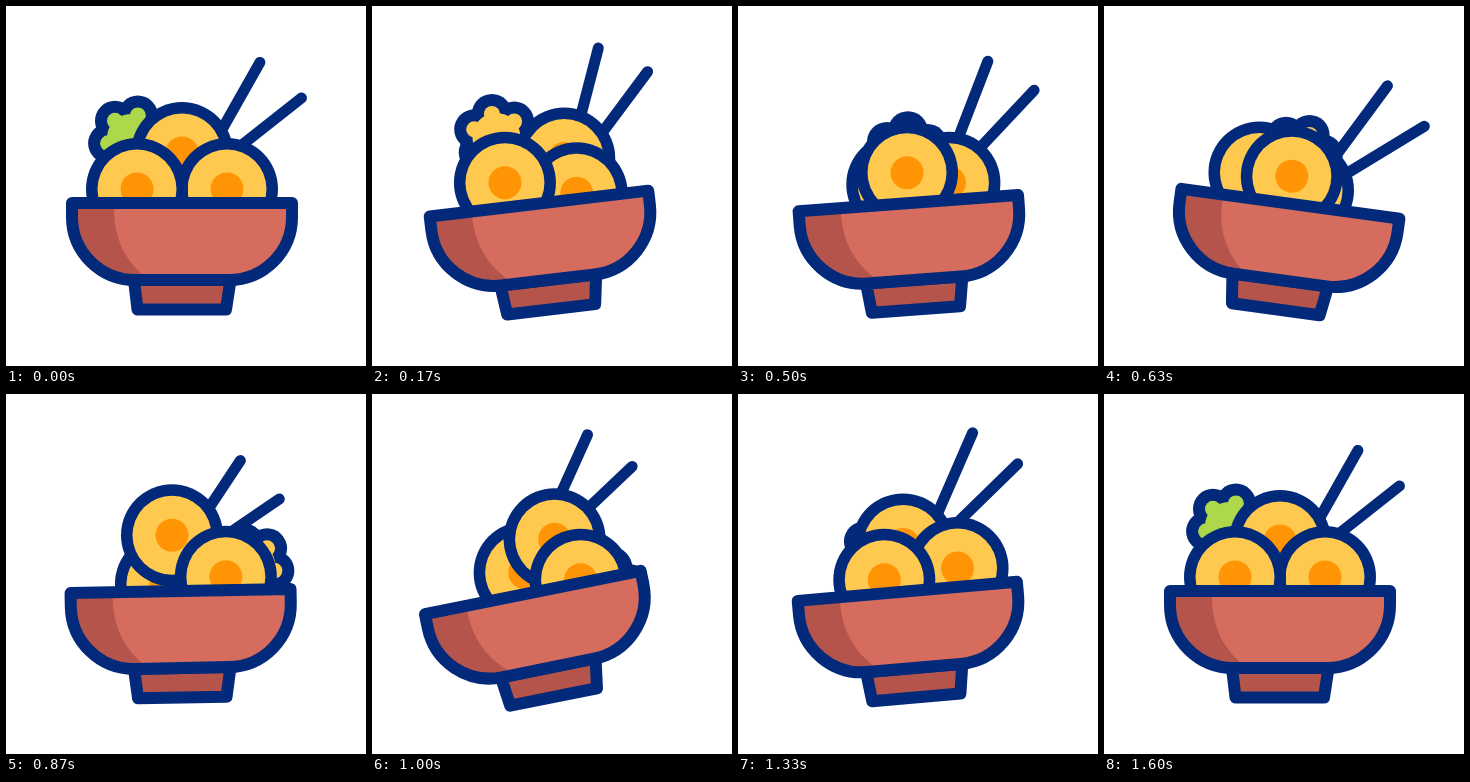
Write an HTML page with a canvas that moves like this. It is 360 by 360 pixels and loops after 2000 ms.

```html
<!DOCTYPE html>
<html lang="en">
<head>
<meta charset="utf-8">
<title>Stirring bowl</title>
<style>
  html, body { margin: 0; width: 100%; height: 100%; overflow: hidden; background: #fff; }
  canvas { display: block; width: 100vw; height: 100vh; object-fit: contain; }
</style>
</head>
<body>
<canvas id="stage" width="360" height="360"></canvas>
<script>
const ctx = document.getElementById('stage').getContext('2d');

const LOOP = 2000, LAST_STEP = 48, STROKE = 12;
const NAVY = '#03297a', YELLOW = '#ffc94f', ORANGE = '#ff9505';
const GREEN = '#aed84c', RED = '#d56c5e', DARK_RED = '#b5544a';

const radians = degrees => degrees * Math.PI / 180;

function hermite(from, to, slopeFrom, slopeTo, p) {
  const q = 1 - p;
  return from * q * q * (1 + 2 * p) + to * p * p * (3 - 2 * p)
    + p * q * (slopeFrom * q - slopeTo * p);
}

// Monotone curve through the keys, at rest at both ends and at every extreme.
function curve(times, values) {
  const last = times.length - 1;
  const rise = i => (values[i + 1] - values[i]) / (times[i + 1] - times[i]);
  const slope = i => {
    if (i === 0 || i === last) return 0;
    const a = rise(i - 1), b = rise(i);
    return a * b > 0 ? 2 * a * b / (a + b) : 0;
  };
  return time => {
    if (time >= times[last]) return values[last];
    const i = times.findIndex(t => t > time) - 1;
    const span = times[i + 1] - times[i];
    return hermite(values[i], values[i + 1], slope(i) * span, slope(i + 1) * span,
      (time - times[i]) / span);
  };
}

// Smooth closed path through four points, a quarter turn apart.
function orbit(...points) {
  const along = (axis, quarters) => {
    const i = Math.floor(quarters);
    const at = n => points[(i + n + 4) % 4][axis];
    return hermite(at(0), at(1), (at(1) - at(-1)) / 2, (at(2) - at(0)) / 2, quarters - i);
  };
  return turn => [along(0, turn / 90), along(1, turn / 90)];
}

const KEYS = [0, 10, 19, 26, 35, 40, LAST_STEP];
const turnAt = curve(KEYS, [0, 80, 129, 205, 279, 330, 360]);
const tiltAt = curve([0, 10.5, 20.3, 33, 44.5], [0, -14.5, 8.9, -14.7, 0]);

// Back to front.
const eggs = [
  orbit([176, 147], [215, 172], [168, 194], [151, 168]),
  orbit([221, 183], [164, 184], [158, 143], [197, 152]),
  orbit([131, 183], [159, 166], [220, 180], [193, 187])
];
const lettuce = orbit([125, 132], [155, 147], [243, 158], [215, 205]);

// Both sticks are one rigid fork that swings about its foot.
const fork = {
  x: curve(KEYS, [184, 198, 199, 156, 161, 178, 184]),
  y: curve(KEYS, [180, 179, 194, 185, 155, 169, 180]),
  swing: curve(KEYS, [0, -30, 7, 4, -16, -6, 0]),
  prongs: [29.5, 51.7],
  reach: 142
};

function disc(x, y, radius, fill) {
  ctx.beginPath();
  ctx.arc(x, y, radius, 0, 2 * Math.PI);
  ctx.fillStyle = fill;
  ctx.fill();
}

function drawFork(step) {
  const x = fork.x(step), y = fork.y(step);
  ctx.lineWidth = 11;
  for (const prong of fork.prongs) {
    const angle = radians(prong + fork.swing(step));
    const dx = fork.reach * Math.sin(angle), dy = -fork.reach * Math.cos(angle);
    ctx.beginPath();
    ctx.moveTo(x + dx, y + dy);
    ctx.lineTo(x + dx * 0.15, y + dy * 0.15);
    ctx.stroke();
  }
}

function drawLettuce(step) {
  const [x, y] = lettuce(turnAt(step));
  const resting = step < 5 || step > 43;
  for (const [grow, fill] of [[STROKE / 2, NAVY], [-STROKE / 2, resting ? GREEN : YELLOW]]) {
    disc(x, y, 30 + grow, fill);
    for (let lobe = 0; lobe < 6; lobe++) {
      const angle = radians(turnAt(step) + lobe * 60 - 133);
      disc(x + 23.5 * Math.cos(angle), y + 23.5 * Math.sin(angle), 14 + grow, fill);
    }
  }
}

function drawEgg([x, y]) {
  disc(x, y, 51, NAVY);
  disc(x, y, 39.5, YELLOW);
  disc(x, y, 16.5, ORANGE);
}

const base = new Path2D('M128 274L131.500 303.500H220L224.500 274Z');
const body = new Path2D('M66 197V211A63 63 0 0 0 129 274H223A63 63 0 0 0 286 211V197Z');
const shade = new Path2D('M66 197H108V203C108 236 122 258 143 274H129A63 63 0 0 1 66 211Z');

function drawBowl(step) {
  ctx.save();
  ctx.translate(176, 274);
  ctx.rotate(radians(tiltAt(step)));
  ctx.translate(-176, -274);
  ctx.lineWidth = STROKE;
  ctx.fillStyle = DARK_RED;
  ctx.fill(base);
  ctx.stroke(base);
  ctx.fillStyle = RED;
  ctx.fill(body);
  ctx.fillStyle = DARK_RED;
  ctx.fill(shade);
  ctx.stroke(body);
  ctx.restore();
}

function draw(time) {
  // Thirty steps a second, then a rest.
  const step = Math.min(LAST_STEP, Math.floor(time * 0.03 + 0.11));
  const turn = turnAt(step) % 360;
  ctx.fillStyle = '#fff';
  ctx.fillRect(0, 0, 360, 360);
  ctx.strokeStyle = NAVY;
  ctx.lineCap = ctx.lineJoin = 'round';
  drawFork(step);
  drawLettuce(step);
  for (const egg of eggs) drawEgg(egg(turn));
  drawBowl(step);
}

const start = performance.now();
function tick() {
  draw((performance.now() - start) % LOOP);
  requestAnimationFrame(tick);
}
tick();
</script>
</body>
</html>
```
